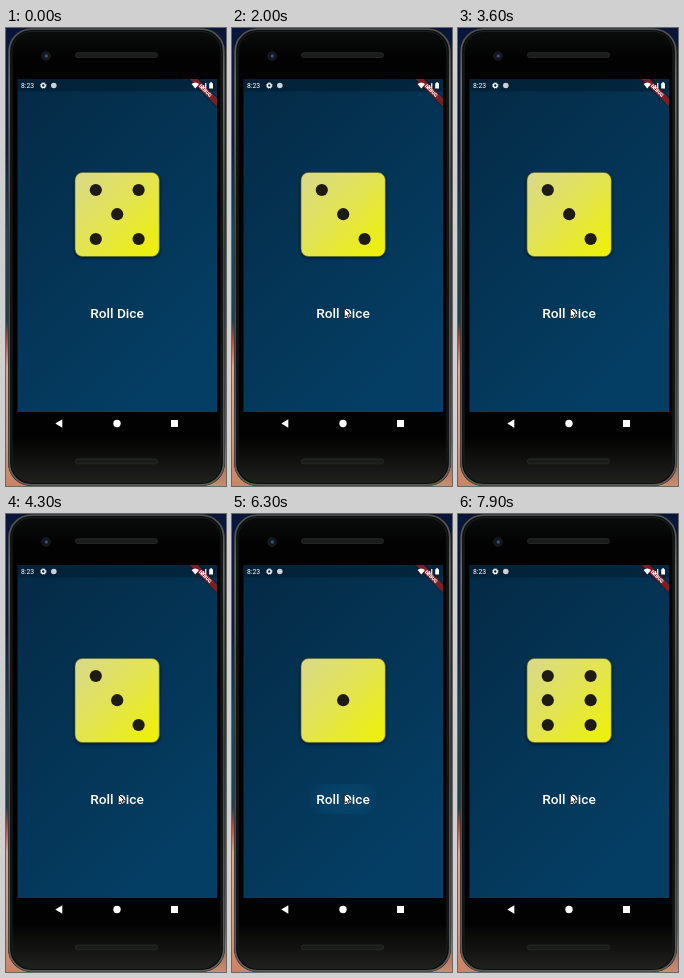
An HTML page for the animation above (8 s loop, 220 px wide and 458 px high).

```html
<!DOCTYPE html>
<html lang="en">
<head>
<meta charset="utf-8">
<title>Dice roller</title>
<style>
html, body { margin: 0; width: 100%; height: 100%; overflow: hidden; background: #07132c; }
svg { display: block; width: 220px; height: 458px; }
text { font-family: Roboto, "Open Sans", sans-serif; fill: #fff; }
</style>
</head>
<body>
<svg viewBox="0 0 220 458">
  <defs>
    <linearGradient id="wall" x2="0" y2="1">
      <stop offset="0" stop-color="#08163c"/>
      <stop offset=".25" stop-color="#0b1b3c"/>
      <stop offset=".45" stop-color="#154a5e"/>
      <stop offset=".64" stop-color="#1c3f52"/>
      <stop offset=".68" stop-color="#b04a40"/>
      <stop offset=".74" stop-color="#e0a588"/>
      <stop offset=".88" stop-color="#d99a7c"/>
      <stop offset="1" stop-color="#c98468"/>
    </linearGradient>
    <linearGradient id="wallRight" x2="0" y2="1">
      <stop offset="0" stop-color="#08163c"/>
      <stop offset=".4" stop-color="#123354"/>
      <stop offset=".7" stop-color="#2c4c62"/>
      <stop offset=".9" stop-color="#8a4a48"/>
      <stop offset="1" stop-color="#c98d70"/>
    </linearGradient>
    <linearGradient id="rim" x2="0" y2="1">
      <stop offset="0" stop-color="#4b4f50"/>
      <stop offset=".12" stop-color="#6a6e6e"/>
      <stop offset=".5" stop-color="#44484a"/>
      <stop offset="1" stop-color="#5d5f5b"/>
    </linearGradient>
    <linearGradient id="body" x2="0" y2="1">
      <stop offset="0" stop-color="#0b0c0c"/>
      <stop offset=".06" stop-color="#020202"/>
      <stop offset=".9" stop-color="#020202"/>
      <stop offset="1" stop-color="#20211d"/>
    </linearGradient>
    <linearGradient id="screen" x1="0" y1="0" x2=".6" y2="1">
      <stop offset="0" stop-color="#042a45"/>
      <stop offset="1" stop-color="#043e64"/>
    </linearGradient>
    <linearGradient id="die" x2="1" y2="1">
      <stop offset="0" stop-color="#d9d98b"/>
      <stop offset=".5" stop-color="#e3e44f"/>
      <stop offset="1" stop-color="#eff200"/>
    </linearGradient>
    <radialGradient id="glow">
      <stop offset="0" stop-color="#0f659a"/>
      <stop offset=".6" stop-color="#0f659a" stop-opacity=".7"/>
      <stop offset="1" stop-color="#0f659a" stop-opacity="0"/>
    </radialGradient>
    <filter id="soft" x="-20%" y="-20%" width="140%" height="140%"><feGaussianBlur stdDeviation="1.8"/></filter>
    <clipPath id="view"><rect x="11.5" y="51" width="199.5" height="333"/></clipPath>
    <clipPath id="button"><rect x="77" y="270" width="68" height="30" rx="9"/></clipPath>
  </defs>

  <rect width="110" height="458" fill="url(#wall)"/>
  <rect x="110" width="110" height="458" fill="url(#wallRight)"/>

  <rect x="2" y="0" width="217" height="458" rx="23" fill="#0b0d0d"/>
  <rect x="3.2" y="1.2" width="214.6" height="455.6" rx="22" fill="none" stroke="url(#rim)" stroke-width="1.8"/>
  <rect x="6" y="3.5" width="209" height="451" rx="20" fill="url(#body)" stroke="#1d2021"/>
  <circle cx="40" cy="28" r="4.2" fill="#111519" stroke="#23282c" stroke-width=".8"/>
  <circle cx="40.3" cy="28" r="1.7" fill="#34508c"/>
  <g fill="#1a1c1b" stroke="#30322f" stroke-width=".7">
    <rect x="69.5" y="24.7" width="82" height="4.8" rx="2.2"/>
    <rect x="69.5" y="431" width="82" height="4.8" rx="2.2"/>
  </g>

  <g clip-path="url(#view)">
    <rect x="11" y="51" width="200" height="333" fill="url(#screen)"/>
    <rect x="11" y="51" width="200" height="12.5" fill="#001522" opacity=".4"/>
    <g transform="translate(211 51) rotate(45)">
      <rect x="-22" y="13.6" width="44" height="5.8" fill="#000" opacity=".5" filter="url(#soft)"/>
      <rect x="-22" y="13.6" width="44" height="5.8" fill="#7d1d26"/>
      <text y="18.2" font-size="4.9" font-weight="900" text-anchor="middle">DEBUG</text>
    </g>
  </g>

  <text x="15" y="60" font-size="6.8">8:23</text>
  <g fill="#fff">
    <circle cx="37.3" cy="57.5" r="1.9" fill="none" stroke="#fff" stroke-width="1.4"/>
    <circle cx="37.3" cy="57.5" r="2.8" fill="none" stroke="#fff" stroke-width=".8" stroke-dasharray="1.1 1.1"/>
    <circle cx="47.8" cy="57.5" r="2.8" opacity=".8"/>
    <path d="M185.6 56Q189.3 52.8 193 56L189.3 60.4Z"/>
    <path d="M194.6 60.4V58.8H196V60.4ZM196.8 60.4V57H198.2V60.4ZM199 60.4V55H200.4V60.4Z" opacity=".85"/>
    <path d="M203.2 55.2H204.2V54.3H206V55.2H207V60.6H203.2Z"/>
    <path d="M56.3 391.2V399.8L49.3 395.5Z"/>
    <circle cx="111" cy="395.5" r="3.7"/>
    <rect x="165" y="392" width="7" height="7"/>
  </g>

  <rect x="68.5" y="146" width="85.5" height="84" rx="8" fill="#00101c" opacity=".75" filter="url(#soft)"/>
  <rect x="69" y="144.5" width="84.3" height="84" rx="7.5" fill="url(#die)" stroke="#5d6330" stroke-width=".6"/>
  <g id="pips" fill="#1e1b16"></g>

  <g clip-path="url(#button)"><circle id="ripple" cx="112" cy="284" fill="url(#glow)"/></g>
  <text x="111" y="290" font-size="13.7" font-weight="500" text-anchor="middle">Roll Dice</text>
  <path id="cursor" d="M0 0V9L2.1 7.1L3.6 10.3L5.2 9.6L3.8 6.5H6.6Z" fill="#fff" stroke="#0a0d10" stroke-width=".9"/>
</svg>
<script>
const LOOP = 8000;
const el = id => document.getElementById(id);

// Pip places on a 3 by 3 grid, counted row by row
const faces = { 1: [4], 3: [0, 4, 8], 5: [0, 2, 4, 6, 8], 6: [0, 2, 3, 5, 6, 8] };
const rolls = [[0, 5], [1500, 3], [4800, 5], [6000, 1], [7200, 6]];
// Time, x, y
const path = [[550, 76, 458], [1000, 99, 295], [1400, 112.3, 280.3]];

const columns = [89.8, 111.2, 132.6], rows = [162, 186.2, 211];
const pips = Array.from({ length: 9 }, (_, i) => {
  const dot = document.createElementNS("http://www.w3.org/2000/svg", "circle");
  dot.setAttribute("cx", columns[i % 3]);
  dot.setAttribute("cy", rows[Math.floor(i / 3)]);
  dot.setAttribute("r", 6.1);
  el("pips").append(dot);
  return dot;
});

function cursorAt(t) {
  const next = path.findIndex(p => t < p[0]);
  if (next < 0) return path.at(-1).slice(1);
  if (next === 0) return path[0].slice(1);
  const a = path[next - 1], b = path[next];
  const k = (t - a[0]) / (b[0] - a[0]);
  const ease = 1 - (1 - k) ** 2;
  return [1, 2].map(i => a[i] + (b[i] - a[i]) * ease);
}

function draw(t) {
  const [start, face] = rolls.findLast(r => r[0] <= t);
  pips.forEach((dot, i) => dot.setAttribute("visibility", faces[face].includes(i) ? "visible" : "hidden"));

  const age = start ? t - start : LOOP;
  const grow = Math.min(1, age / 300);
  const fade = Math.max(0, 1 - Math.max(0, age - 150) / 350);
  el("ripple").setAttribute("r", 8 + 30 * grow);
  el("ripple").setAttribute("opacity", 0.4 * fade);

  el("cursor").setAttribute("transform", `translate(${cursorAt(t)})`);
  el("cursor").setAttribute("visibility", t < path[0][0] ? "hidden" : "visible");
}

const begin = performance.now();
function tick() {
  draw((performance.now() - begin) % LOOP);
  requestAnimationFrame(tick);
}
tick();
</script>
</body>
</html>
```
